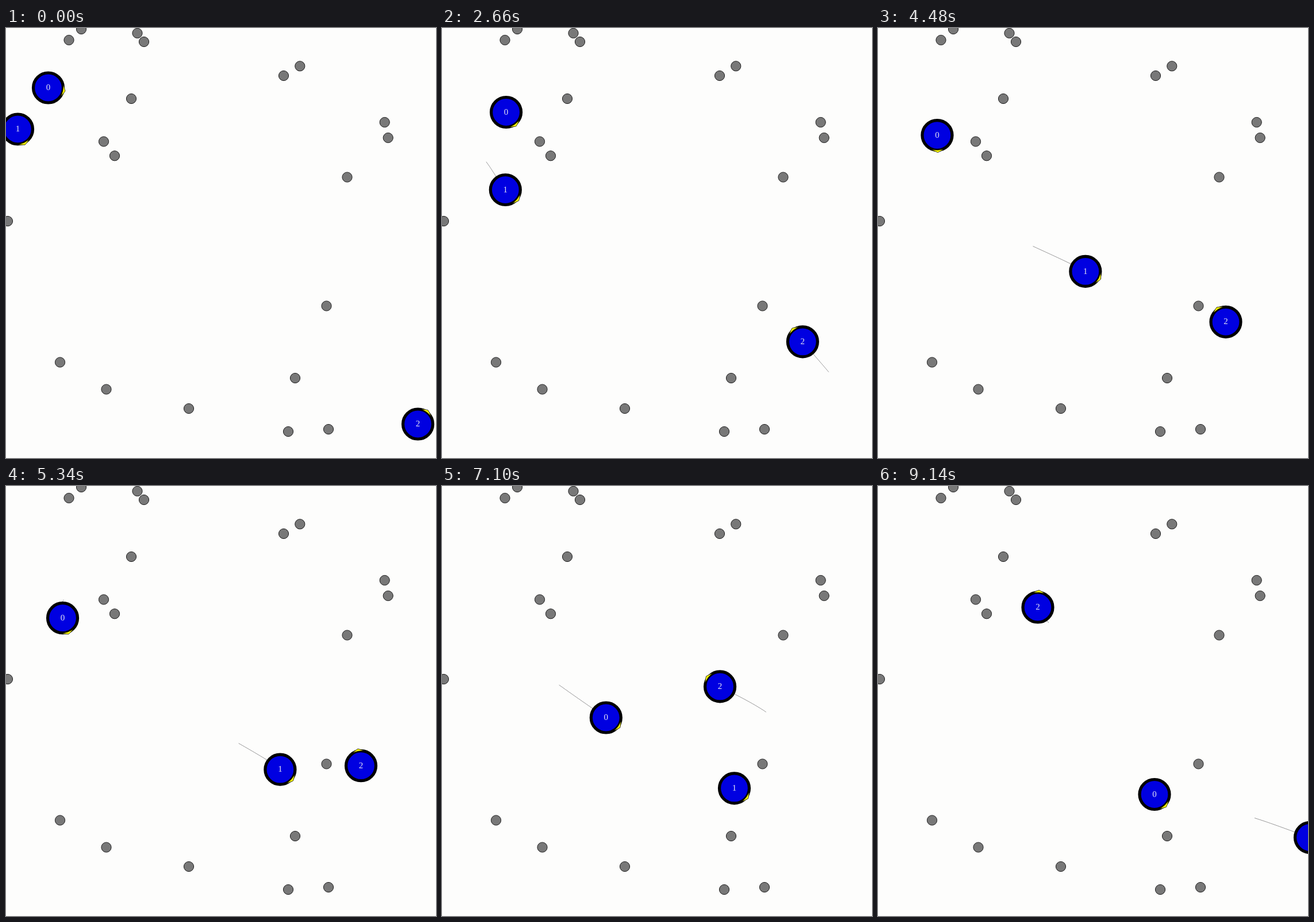
An HTML page with a canvas that plays this animation: 748 px wide and 748 px high, repeating every 9.7 s.

```html
<!DOCTYPE html>
<html lang="en">
<head>
<meta charset="utf-8">
<title>Three robots among obstacles</title>
<style>
  html, body { margin: 0; width: 100%; height: 100%; overflow: hidden; background: #fdfdfc; }
  canvas { display: block; }
</style>
</head>
<body>
<canvas id="stage" width="748" height="748"></canvas>
<script>
const ctx = document.getElementById('stage').getContext('2d');
const LOOP = 9700, START = 1260, END = 9140, TRAIL = 600;

const obstacles = [
  [109.5, 21], [131, 2], [228.5, 9], [240, 24], [218, 123], [170, 197.5], [189, 222.3],
  [483, 83], [511.3, 66.3], [658.7, 164], [664.7, 191], [593.5, 259.5], [3, 336],
  [557.5, 483.5], [94, 581.5], [174.5, 628.5], [318, 662], [503, 609], [491, 702], [561, 698]
];

// Waypoints: time, x, y, heading in degrees
const robot0 = [
  [1260, 73.5, 104, 11], [1920, 110.5, 131.5, -33], [3460, 112, 157.5, 152],
  [4240, 104, 164, 95], [4480, 103, 186.5, 88], [5220, 95, 217, 75], [5560, 114, 261, 58],
  [6160, 173, 323.5, 42], [6580, 212, 352, 36], [7460, 339, 440, 35], [8060, 418, 495, 34],
  [8500, 472, 530, 34], [9140, 481, 536.5, 47]
];
const robot1 = [
  [1260, 20.5, 176, 65], [1920, 68.3, 222, 43], [2860, 125, 298, 38], [3460, 206.5, 348.5, 28],
  [4480, 360.7, 423.3, 27], [5300, 476, 492, 40], [6160, 487, 507, 90], [7460, 522, 535, 20],
  [8060, 591.5, 559.5, 13], [8540, 655, 577.5, 18], [9140, 751.5, 611.5, 20]
];
const robot2 = [
  [1260, 716.5, 689, -54], [1320, 719, 681, -80], [1660, 708.5, 643, -122], [1920, 684.3, 612.3, -128],
  [2860, 619, 536, -128], [3460, 608.5, 523, -70], [4480, 605, 511.3, -122], [5560, 619, 477, -98],
  [6160, 594, 420.5, -132], [7460, 433, 321, -146], [8060, 347, 268.3, -150],
  [8540, 297, 238, -145], [9140, 278, 211, -86]
];
const robots = [robot0, robot1, robot2];

// Average speed of one coordinate between two waypoints
const speed = (a, b, j) => (b[j] - a[j]) / (b[0] - a[0]);

// Tangent at waypoint i that never overshoots
function tangent(path, i, j) {
  if (i === 0) return speed(path[0], path[1], j);
  if (i === path.length - 1) return speed(path[i - 1], path[i], j);
  const u = speed(path[i - 1], path[i], j), v = speed(path[i], path[i + 1], j);
  return u * v <= 0 ? 0 : 2 * u * v / (u + v);
}

function poseAt(path, t) {
  const next = path.findIndex(p => p[0] > t);
  if (next === 0) return path[0].slice(1);
  if (next < 0) return path[path.length - 1].slice(1);
  const i = next - 1, a = path[i], b = path[next];
  const d = b[0] - a[0], k = (t - a[0]) / d, r = 1 - k;
  return [1, 2, 3].map(j =>
    a[j] + (b[j] - a[j]) * k * k * (3 - 2 * k) +
    d * k * r * (r * tangent(path, i, j) - k * tangent(path, next, j)));
}

function disc(x, y, r, fill, stroke, width) {
  ctx.beginPath();
  ctx.arc(x, y, r, 0, Math.PI * 2);
  ctx.fillStyle = fill;
  ctx.fill();
  ctx.strokeStyle = stroke;
  ctx.lineWidth = width;
  ctx.stroke();
}

function drawTrail(path, t) {
  const from = Math.max(START, t - TRAIL);
  if (t <= from) return;
  ctx.beginPath();
  for (let s = 0; s <= 30; s++) {
    const [x, y] = poseAt(path, from + (t - from) * s / 30);
    ctx.lineTo(x, y);
  }
  ctx.strokeStyle = '#8c8c8c';
  ctx.lineWidth = 0.9;
  ctx.stroke();
}

function drawRobot(path, t, label) {
  const [x, y, deg] = poseAt(path, t);
  disc(x, y, 26, '#0000e1', '#000', 5.2);

  ctx.save();
  ctx.translate(x, y);
  ctx.rotate(deg * Math.PI / 180);
  ctx.beginPath();
  ctx.moveTo(24.8, -11);
  ctx.lineTo(30, 0);
  ctx.lineTo(24.8, 11);
  ctx.lineTo(25.8, 0);
  ctx.closePath();
  ctx.fillStyle = '#ffff00';
  ctx.fill();
  ctx.strokeStyle = '#000';
  ctx.lineWidth = 0.7;
  ctx.stroke();
  ctx.restore();

  ctx.fillStyle = '#e4e4f4';
  ctx.fillText(label, x, y + 4.2);
}

function frame(now) {
  const t = Math.min(now % LOOP, END);
  ctx.fillStyle = '#fdfdfc';
  ctx.fillRect(0, 0, 748, 748);
  ctx.font = '15px "Liberation Serif", serif';
  ctx.textAlign = 'center';
  for (const [x, y] of obstacles) disc(x, y, 8.6, '#787878', '#1c1c1c', 1);
  for (const path of robots) drawTrail(path, t);
  robots.forEach((path, i) => drawRobot(path, t, String(i)));
}

const began = performance.now();
function tick() {
  frame(performance.now() - began);
  requestAnimationFrame(tick);
}
tick();
</script>
</body>
</html>
```
